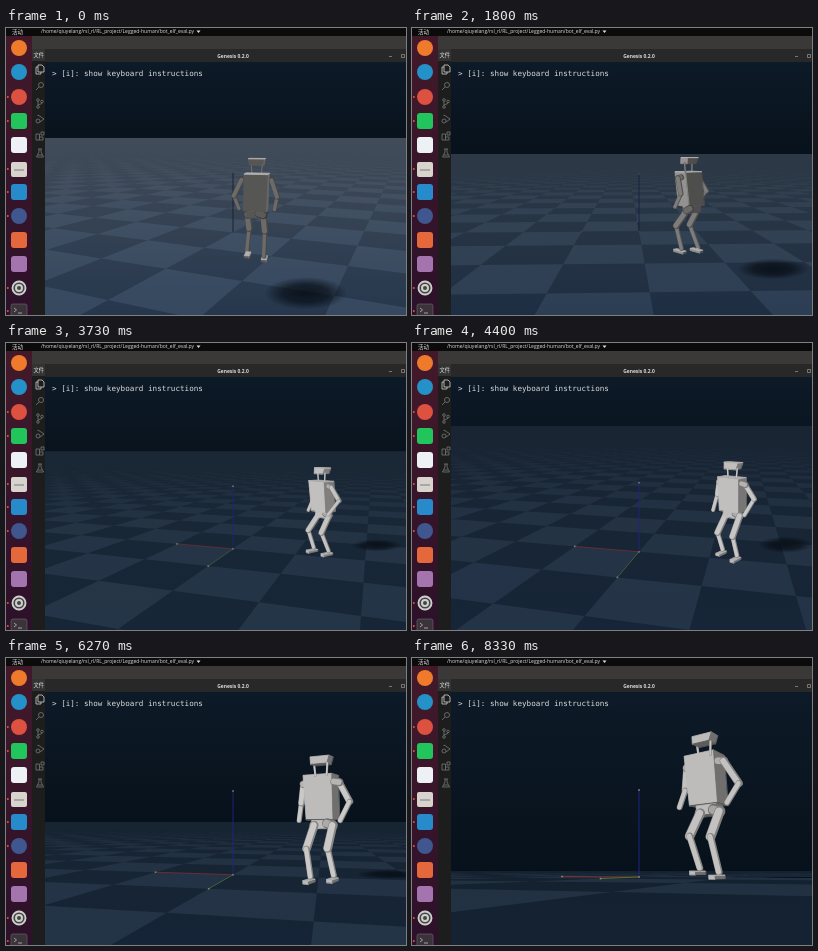
An HTML page with a canvas for the animation above (8400 ms loop, 400 px wide and 287 px high).

```html
<!DOCTYPE html>
<html lang="zh">
<head>
<meta charset="utf-8">
<title>Robot viewer</title>
<style>
html, body { margin: 0; width: 100%; height: 100%; overflow: hidden; background: #1d1d1d; }
canvas, svg { position: absolute; left: 0; top: 0; width: 400px; height: 287px; }
text { font-family: "Open Sans", "Noto Sans CJK SC", sans-serif; fill: #dcdcdc; }
</style>
</head>
<body>
<canvas id="scene"></canvas>
<svg viewBox="0 0 400 287">
  <path d="M26 8H400V34H39V287H26Z" fill="#1c1d1c"/>
  <path d="M26 8H400V21H26Z" fill="#3a3938"/>
  <path d="M39 21H400V34H39Z" fill="#282828"/>
  <path d="M26 21H39V33H26Z" fill="#333"/>
  <defs><linearGradient id="dockFill" x2="0" y2="1"><stop stop-color="#43192a"/><stop offset="1" stop-color="#2c112a"/></linearGradient></defs>
  <path d="M0 8H26V287H0Z" fill="url(#dockFill)"/>
  <path d="M0 0H400V8H0Z" fill="#0b0b0b"/>
  <text x="6" y="5.800" font-size="5.500">活动</text>
  <text x="35" y="5.400" font-size="5.060">/home/qiuyelang/rsl_rl/RL_project/Legged-human/bot_elf_eval.py</text>
  <path d="M190.500 2.500h4l-2 2.500z" fill="#ddd"/>
  <text x="27.500" y="29.300" font-size="5.300">文件</text>
  <text x="227" y="29.800" font-size="4.950" font-weight="700" text-anchor="middle">Genesis 0.2.0</text>
  <path d="M383 28.500h3M395.500 26.500h3v3h-3z" fill="none" stroke="#999" stroke-width=".7"/>
  <text x="46" y="47.600" font-size="7.600" style="font-family:'DejaVu Sans Mono',monospace">&gt; [i]: show keyboard instructions</text>
  <g id="dock"></g>
  <g fill="none" stroke="#777a7a" stroke-width=".8">
    <path d="M32 37h4l2 2v5h-6zM32 39h-2v7h5v-2" stroke="#d0d0d0"/>
    <circle cx="35" cy="57" r="2.500"/><path d="M33 59l-3 3"/>
    <circle cx="32" cy="72" r="1.300"/><circle cx="36" cy="73.500" r="1.300"/><circle cx="32" cy="79" r="1.300"/><path d="M32 73.300v4.400M36 74.800c0 2-4 1-4 2.500"/>
    <path d="M32 88v-1l6 4-4 3"/><circle cx="32" cy="93" r="2"/>
    <path d="M30 106h3.500v6H30zM33.500 109h3.500v3h-3.500M35 104h3v3h-3z"/>
    <path d="M32 121h4M33 121v3l-2.500 5h7L35 124v-3M32 127h4"/>
  </g>
</svg>
<script>
const LOOP = 8400, FPS = 15, FOCAL = 387, CX = 227, CY = 175;
const ctx = document.getElementById('scene').getContext('2d');
const ratio = Math.max(1, window.devicePixelRatio || 1);
ctx.canvas.width = 400 * ratio;
ctx.canvas.height = 287 * ratio;
const { sin, cos, hypot, PI } = Math;

// Dock: shape, vertical centre, colour, running marker
const dock = [
  ['circle', 20, '#ef7a2c', 0], ['circle', 44, '#2492c8', 0], ['circle', 69, '#dc5140', 1],
  ['square', 93, '#22c55b', 1], ['square', 117, '#edf1f5', 0], ['folder', 141, '#d8d4cd', 1],
  ['square', 164, '#278bcb', 1], ['circle', 188, '#40568f', 1], ['square', 212, '#e4683b', 0],
  ['square', 236, '#a374ae', 0], ['gear', 260, '#cfcfcd', 1], ['terminal', 283, '#3a343a', 1]
];
const dockShapes = {
  circle: (y, c) => `<circle cx="13" cy="${y}" r="8" fill="${c}"/>`,
  square: (y, c) => `<rect x="5" y="${y - 8}" width="16" height="16" rx="3" fill="${c}"/>`,
  folder: (y, c) => `<rect x="5" y="${y - 7}" width="16" height="15" rx="2" fill="${c}"/><path d="M8 ${y + 1}h10" stroke="#999" stroke-width="1.500"/>`,
  gear: (y, c) => `<circle cx="13" cy="${y}" r="7.500" fill="#444"/><g fill="none" stroke="${c}"><circle cx="13" cy="${y}" r="6.500" stroke-width="1.800"/><circle cx="13" cy="${y}" r="3" stroke-width="2"/></g>`,
  terminal: (y, c) => `<rect x="5" y="${y - 7}" width="16" height="15" rx="2" fill="${c}" stroke="#6f6a6f" stroke-width=".6"/><path d="M8 ${y - 3}l2.500 2-2.500 2M12 ${y + 2}h4" fill="none" stroke="#bbb" stroke-width=".8"/>`
};
document.getElementById('dock').innerHTML = dock.map(([shape, y, color, running]) =>
  dockShapes[shape](y, color) + (running ? `<circle cx="1.800" cy="${y}" r="1" fill="#dc573b"/>` : '')).join('');

const times = [0, 1.8, 2.8, 4.4, 5.47, 7, 8.33];
const tracks = {
  horizon: [110, 126, 150, 83, 110, 204, 213],
  dist: [6.4, 6.7, 6.8, 5.45, 4.95, 4.45, 4.43],
  orbit: [114, 88, 33, 15, 12.4, 15, 20],
  right: [.29, .7, 1.42, 1.24, 1.06, .81, .63],
  forward: [-1.5, -1.46, -.42, -.27, -.42, -.77, -.92],
  heading: [80, 127, 185, 228, 238, 235, 231],
  glare: [1, .55, .22, .1, .08, .05, 0]
};

// Monotone cubic through the track's keys
function sample(keys, t) {
  const slope = i => (keys[i + 1] - keys[i]) / (times[i + 1] - times[i]);
  const tangent = i => {
    if (i === 0) return slope(0);
    if (i === keys.length - 1) return slope(i - 1);
    const a = slope(i - 1), b = slope(i);
    return a * b <= 0 ? 0 : 2 * a * b / (a + b);
  };
  let i = 0;
  while (i < times.length - 2 && t > times[i + 1]) i++;
  const h = times[i + 1] - times[i], s = Math.min(1, (t - times[i]) / h);
  const s2 = s * s, s3 = s2 * s;
  return (2 * s3 - 3 * s2 + 1) * keys[i] + (s3 - 2 * s2 + s) * h * tangent(i)
    + (3 * s2 - 2 * s3) * keys[i + 1] + (s3 - s2) * h * tangent(i + 1);
}

const mix = (a, b, k) => `rgb(${a.map((v, i) => Math.round(v + (b[i] - v) * k))})`;
const grey = k => {
  const v = Math.max(30, Math.min(235, 226 * k));
  return `rgb(${[v, v * .993, v * .985].map(Math.round)})`;
};

let view;
function setView(t) {
  view = { t };
  for (const name in tracks) view[name] = sample(tracks[name], t);
  const tilt = Math.atan((CY - view.horizon) / FOCAL), a = view.orbit * PI / 180;
  Object.assign(view, { st: sin(tilt), ct: cos(tilt), sa: sin(a), ca: cos(a) });
  const [lr, lf] = turn(.8, .85);
  view.light = [lr / 1.44, lf / 1.44, .59];
}

// World ground coordinates to camera-aligned right and forward
const turn = (x, y) => [-x * view.ca - y * view.sa, x * view.sa - y * view.ca];

function toCamera([r, f, z]) {
  const ahead = f + view.dist * view.ct, up = z - .5 - view.dist * view.st;
  return [r, up * view.ct + ahead * view.st, ahead * view.ct - up * view.st];
}
const toScreen = ([x, y, d]) => [CX + FOCAL * x / d, CY - FOCAL * y / d, d];
const project = p => toScreen(toCamera(p));

function clipNear(points, near = .15) {
  const out = [];
  points.forEach((p, i) => {
    const q = points[(i + 1) % points.length];
    if (p[2] >= near) out.push(p);
    if ((p[2] < near) !== (q[2] < near)) {
      const k = (near - p[2]) / (q[2] - p[2]);
      out.push(p.map((v, j) => v + (q[j] - v) * k));
    }
  });
  return out;
}

function addPolygon(points) {
  points.forEach(([x, y], i) => i ? ctx.lineTo(x, y) : ctx.moveTo(x, y));
  ctx.closePath();
}

function vertical(y0, y1, c0, c1) {
  const g = ctx.createLinearGradient(0, y0, 0, y1);
  g.addColorStop(0, c0);
  g.addColorStop(1, c1);
  return g;
}

function drawWorld() {
  const { horizon, glare } = view;
  ctx.fillStyle = vertical(34, Math.max(horizon, 130), '#0d1a27', '#07111b');
  ctx.fillRect(39, 34, 361, 253);
  ctx.fillStyle = vertical(horizon, Math.max(287, horizon + 110),
    mix([20, 33, 47], [66, 76, 89], glare), mix([20, 35, 52], [38, 55, 77], glare));
  ctx.fillRect(39, horizon, 361, 287 - horizon);
  for (let x = -26; x < 26; x++) {
    for (let y = -26; y < 26; y++) {
      if ((x + y) & 1) continue;
      const corners = [[0, 0], [1, 0], [1, 1], [0, 1]].map(([i, j]) => toCamera([...turn(x + i, y + j), 0]));
      const tile = clipNear(corners);
      if (tile.length < 3) continue;
      const far = hypot(corners[0][0], corners[0][2]) / 15;
      ctx.fillStyle = `rgba(150,180,210,${(.11 + .03 * glare) / (1 + far * far)})`;
      ctx.beginPath();
      addPolygon(tile.map(toScreen));
      ctx.fill();
    }
  }
}

function drawShadow() {
  const [dr, df] = turn(-.8, -.85);
  const [x, y, d] = project([view.right + dr, view.forward + df, 0]);
  const radius = .42 * FOCAL / d;
  const camHeight = .5 + view.dist * view.st;
  ctx.save();
  ctx.translate(x, y);
  ctx.scale(radius, radius * Math.max(.02, camHeight / d));
  const g = ctx.createRadialGradient(0, 0, 0, 0, 0, 1);
  g.addColorStop(0, 'rgba(6,12,20,.85)');
  g.addColorStop(.55, 'rgba(6,12,20,.65)');
  g.addColorStop(1, 'rgba(6,12,20,0)');
  ctx.fillStyle = g;
  ctx.beginPath();
  ctx.arc(0, 0, 1, 0, 2 * PI);
  ctx.fill();
  ctx.restore();
}

function drawAxes() {
  const origin = project([0, 0, 0]), lit = 1 - view.glare;
  const axes = [[[...turn(1, 0), 0], [150, 50, 48]], [[...turn(0, 1), 0], [84, 130, 52]], [[0, 0, 1], [34, 40, 150]]];
  axes.forEach(([tip, color], i) => {
    const end = project(tip);
    ctx.globalAlpha = i === 2 ? .85 : lit * .8;
    ctx.strokeStyle = mix([20, 29, 46], color, lit * lit);
    ctx.lineWidth = 1;
    ctx.beginPath();
    ctx.moveTo(origin[0], origin[1]);
    ctx.lineTo(end[0], end[1]);
    ctx.stroke();
    ctx.globalAlpha = lit * lit * .9;
    ctx.fillStyle = '#9a967e';
    ctx.fillRect(end[0] - .8, end[1] - .8, 1.6, 1.6);
  });
  ctx.fillRect(origin[0] - .8, origin[1] - .8, 1.6, 1.6);
  ctx.globalAlpha = 1;
}

function drawRobot() {
  const th = view.heading * PI / 180, hr = cos(th), hf = sin(th), light = view.light;
  const phase = view.t * 2 * PI / .8;
  const bob = .006 * cos(2 * phase) - .01;
  // Body axes: forward u, left l, up z
  const place = ([u, l, z]) => [view.right + u * hr - l * hf, view.forward + u * hf + l * hr, z];
  const parts = [];
  const limbShade = .65 + .5 * (-light[1] * .7 + light[2] * .3);

  function box(u0, u1, l0, l1, z0, z1, lean = 0, taper = 1) {
    const corners = [];
    for (let i = 0; i < 8; i++) {
      const top = i & 4, k = top ? 1 : taper;
      const mid = (l0 + l1) / 2, l = i & 2 ? l1 : l0;
      corners.push(project(place([(i & 1 ? u1 : u0) + (top ? lean : 0), mid + (l - mid) * k, top ? z1 : z0])));
    }
    const faces = [
      [[0, 2, 6, 4], [-hr, -hf, 0]], [[1, 5, 7, 3], [hr, hf, 0]],
      [[0, 4, 5, 1], [hf, -hr, 0]], [[2, 3, 7, 6], [-hf, hr, 0]],
      [[4, 6, 7, 5], [0, 0, 1]], [[0, 1, 3, 2], [0, 0, -1]]
    ];
    const center = project(place([(u0 + u1) / 2, (l0 + l1) / 2, (z0 + z1) / 2]));
    parts.push([center[2], () => {
      for (const [ids, n] of faces) {
        const q = ids.map(i => corners[i]);
        const area = q.reduce((s, p, i) => {
          const next = q[(i + 1) % 4];
          return s + p[0] * next[1] - next[0] * p[1];
        }, 0);
        if (area <= 0) continue;
        ctx.fillStyle = ctx.strokeStyle = grey(.6 + .32 * n.reduce((s, v, i) => s + v * light[i], 0));
        ctx.lineWidth = .8;
        ctx.lineJoin = 'round';
        ctx.beginPath();
        addPolygon(q);
        ctx.fill();
        ctx.stroke();
      }
    }]);
  }

  function limb(from, to, width, tone = 1) {
    const a = project(place(from)), b = project(place(to)), d = (a[2] + b[2]) / 2;
    parts.push([d, () => {
      const w = width * FOCAL / d;
      ctx.lineCap = 'round';
      [[1, .66, 0], [.72, 1, -.08]].forEach(([size, shade, shift]) => {
        ctx.strokeStyle = grey(limbShade * shade * tone);
        ctx.lineWidth = w * size;
        ctx.beginPath();
        ctx.moveTo(a[0] + shift * w, a[1]);
        ctx.lineTo(b[0] + shift * w + .01, b[1]);
        ctx.stroke();
      });
    }]);
  }

  for (const side of [-1, 1]) {
    const swing = sin(phase) * side, lift = .04 * Math.max(0, cos(phase) * side);
    const step = .05 * swing + .01;
    const hip = [-.03, side * .1, .61 + bob];
    const knee = [.14 + step * .5 + lift * .6, side * .105, .36 + lift * .5];
    const ankle = [step - .01, side * .11, .06 + lift];
    limb([-.03, side * .04, .63 + bob], hip, .105, .85);
    limb(hip, knee, .09);
    limb(knee, ankle, .062);
    box(step - .06, step + .12, side * .11 - .03, side * .11 + .03, lift, lift + .03);

    const shoulder = [.05, side * .19, 1.04 + bob];
    const elbow = [-.06 - swing * .03, side * .27, .85 + bob];
    const hand = [.1 - swing * .04, side * .23, .66 + bob];
    limb([.05, side * .14, 1.05 + bob], shoulder, .08, .9);
    limb(shoulder, elbow, .07);
    limb(elbow, hand, .055);
    limb([.05, side * .06, 1.12 + bob], [.06, side * .07, 1.24 + bob], .022);
  }
  box(-.08, .04, -.1, .1, .58 + bob, .67 + bob);
  box(-.11, .09, -.15, .15, .67 + bob, 1.12 + bob, .07, .95);
  box(0, .12, -.1, .1, 1.23 + bob, 1.31 + bob, -.02, .85);

  parts.sort((a, b) => b[0] - a[0]).forEach(([, draw]) => draw());
}

function render(ms) {
  setView(Math.floor((ms % LOOP + 4) * FPS / 1000) / FPS);
  ctx.setTransform(ratio, 0, 0, ratio, 0, 0);
  ctx.save();
  ctx.beginPath();
  ctx.rect(39, 34, 361, 253);
  ctx.clip();
  drawWorld();
  drawShadow();
  drawAxes();
  drawRobot();
  ctx.restore();
}

const start = performance.now();
function tick() {
  render(performance.now() - start);
  requestAnimationFrame(tick);
}
tick();
</script>
</body>
</html>
```
